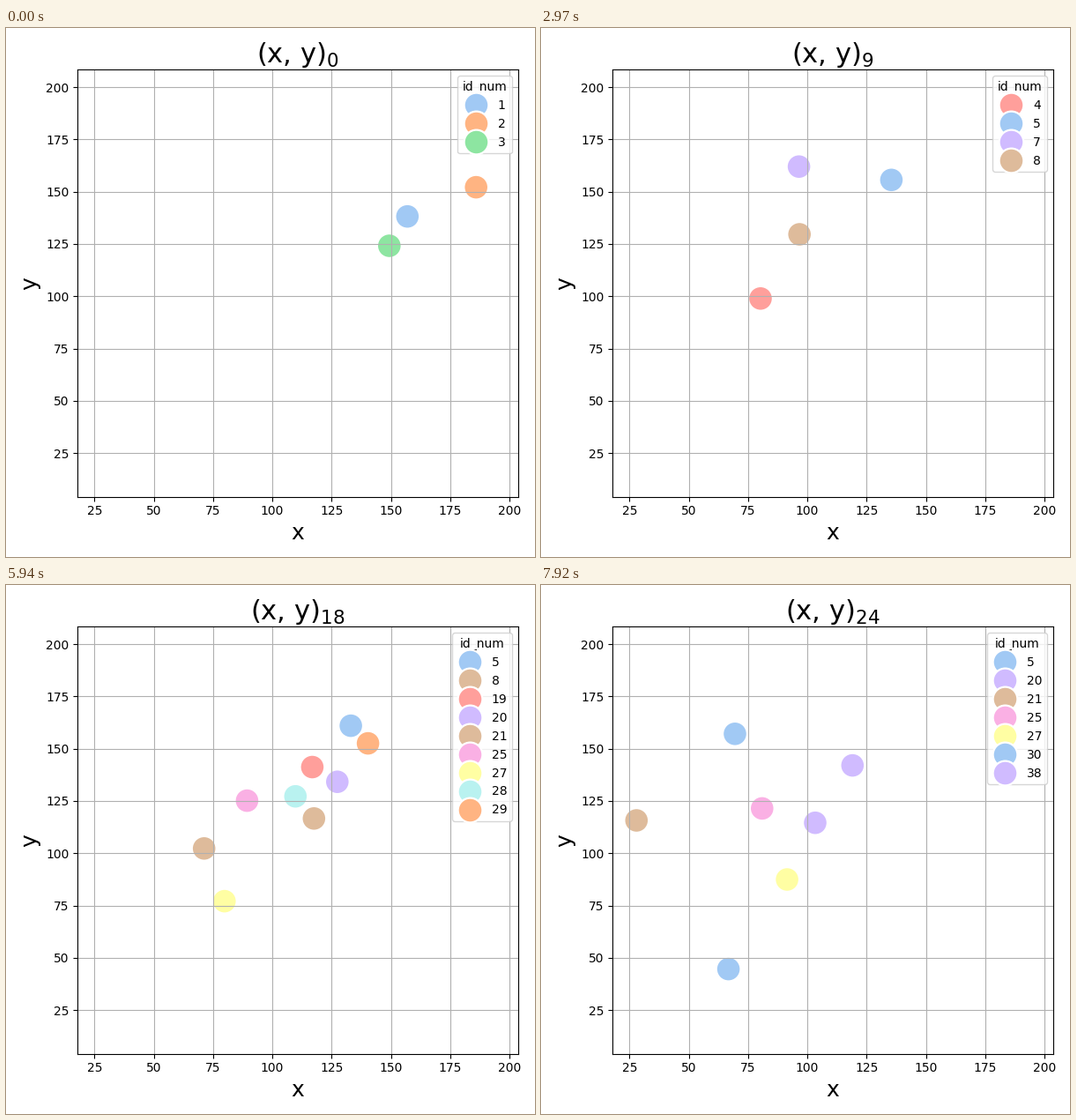
A matplotlib script for the animation above (8000 ms loop, 600 by 600 pixels).

```python
import numpy as np
import matplotlib.pyplot as plt
from matplotlib.animation import FuncAnimation
from matplotlib.lines import Line2D

SIZE, DPI = 600, 100
LOOP, TICK, STEP = 8000, 40, 330          # ms
LAST = (LOOP - 1) // STEP

BLUE, ORANGE, GREEN = "#a1c9f4", "#ffb482", "#8de5a1"
RED, PURPLE, BROWN = "#ff9f9b", "#d0bbff", "#debb9b"
PINK, YELLOW, CYAN = "#fab0e4", "#fffea3", "#b9f2f0"

# axes box in stage pixels, and the pixel place and scale of the value 25
LEFT, RIGHT, TOP, BOTTOM = 81.2, 580.8, 47.3, 531.72
X25, Y25 = 100.4, 482.2
KX, KY = 2.6892, 2.372

STOPS = np.array([0, 5, 9, 12, 18, 22, LAST])   # steps where paths may turn
DRIFT = np.array([13, -11])                     # approach per step, in pixels


def to_data(p):
    return 25 + (p[0] - X25) / KX, 25 + (Y25 - p[1]) / KY


def birth(num):
    """Numbers are handed out in order, at a slowly changing rate."""
    return int(np.rint(np.interp(num, [3, 8, 16, 28, 38], [0, 4, 12, 18, 22])))


class Dot:
    """Drifts in to its first point, then passes one point at each stop."""

    def __init__(self, num, color, *points):
        self.num, self.color = num, color
        self.points = np.array(points).T
        self.born = birth(num)
        first = np.searchsorted(STOPS, self.born)
        end = first + len(points)
        self.stops = STOPS[first:end]
        # lost halfway to the next stop
        self.lost = (self.stops[-1] + STOPS[min(end, len(STOPS) - 1)]) // 2

    def alive(self, step):
        return self.born <= step <= self.lost

    def at(self, step):
        early = max(self.stops[0] - step, 0)
        place = [np.interp(step, self.stops, axis) for axis in self.points]
        return place + early * DRIFT


dots = [
    Dot(1, BLUE, (455.3, 213.7)),
    Dot(2, ORANGE, (533.2, 180.6)),
    Dot(3, GREEN, (434.8, 247)),
    Dot(4, RED, (230.8, 281.6), (249, 306.8), (225, 304.6)),
    Dot(5, BLUE, (406.8, 209.5), (397.4, 172.3), (431.8, 207.2),
        (391.1, 159.6), (319.3, 146.4), (220, 168.8)),
    Dot(7, PURPLE, (243.2, 149), (292.6, 157.2), (297.4, 210.3)),
    Dot(8, BROWN, (274.3, 232.5), (293.2, 234), (340.3, 249.9), (349.3, 264.8)),
    Dot(16, BLUE, (379.3, 219.2)),
    Dot(19, RED, (347.4, 206.5), (310.9, 243.7)),
    Dot(20, PURPLE, (375.8, 223.2), (368.2, 226.3), (353.3, 204.6)),
    Dot(21, BROWN, (224.7, 298.8), (205, 290.2), (108.3, 267)),
    Dot(25, PINK, (273.4, 244.6), (238.3, 226.5), (250.8, 253.4)),
    Dot(27, YELLOW, (247.8, 358.6), (261.7, 333.8), (279.1, 334)),
    Dot(28, CYAN, (328.3, 239.7)),
    Dot(29, ORANGE, (410.6, 179.6)),
    Dot(30, BLUE, (171.2, 420.3), (212.6, 435.6)),
    Dot(37, RED, (348, 252)),
    Dot(38, PURPLE, (289.6, 273.4), (311, 269.7)),
]

fig = plt.figure(figsize=(SIZE / DPI, SIZE / DPI), dpi=DPI)
ax = fig.add_axes([LEFT / SIZE, 1 - BOTTOM / SIZE,
                   (RIGHT - LEFT) / SIZE, (BOTTOM - TOP) / SIZE])
x0, y0 = to_data((LEFT, BOTTOM))
x1, y1 = to_data((RIGHT, TOP))
ticks = np.arange(25, 201, 25)
ax.set(xlim=(x0, x1), ylim=(y0, y1), xticks=ticks, yticks=ticks)
ax.set_xlabel("x", fontsize=18)
ax.set_ylabel("y", fontsize=18)
ax.grid(True)
cloud = ax.scatter([], [], s=400, edgecolors="white", linewidths=1.6)


def handle(color):
    return Line2D([], [], linestyle="", marker="o", markersize=20, color=color,
                  markeredgecolor="white", markeredgewidth=1.6)


def draw(frame):
    step = min((frame * TICK + TICK - 1) // STEP, LAST)
    live = [d for d in dots if d.alive(step)]
    cloud.set_offsets([to_data(d.at(step)) for d in live])
    cloud.set_facecolors([d.color for d in live])
    ax.set_title(f"(x, y)$_{{{step}}}$", fontsize=22)
    ax.legend([handle(d.color) for d in live], [str(d.num) for d in live],
              title="id_num", loc="upper right")
    return []


anim = FuncAnimation(fig, draw, frames=LOOP // TICK, interval=TICK,
                     init_func=lambda: draw(0), repeat=True, repeat_delay=0)
plt.show()
```
